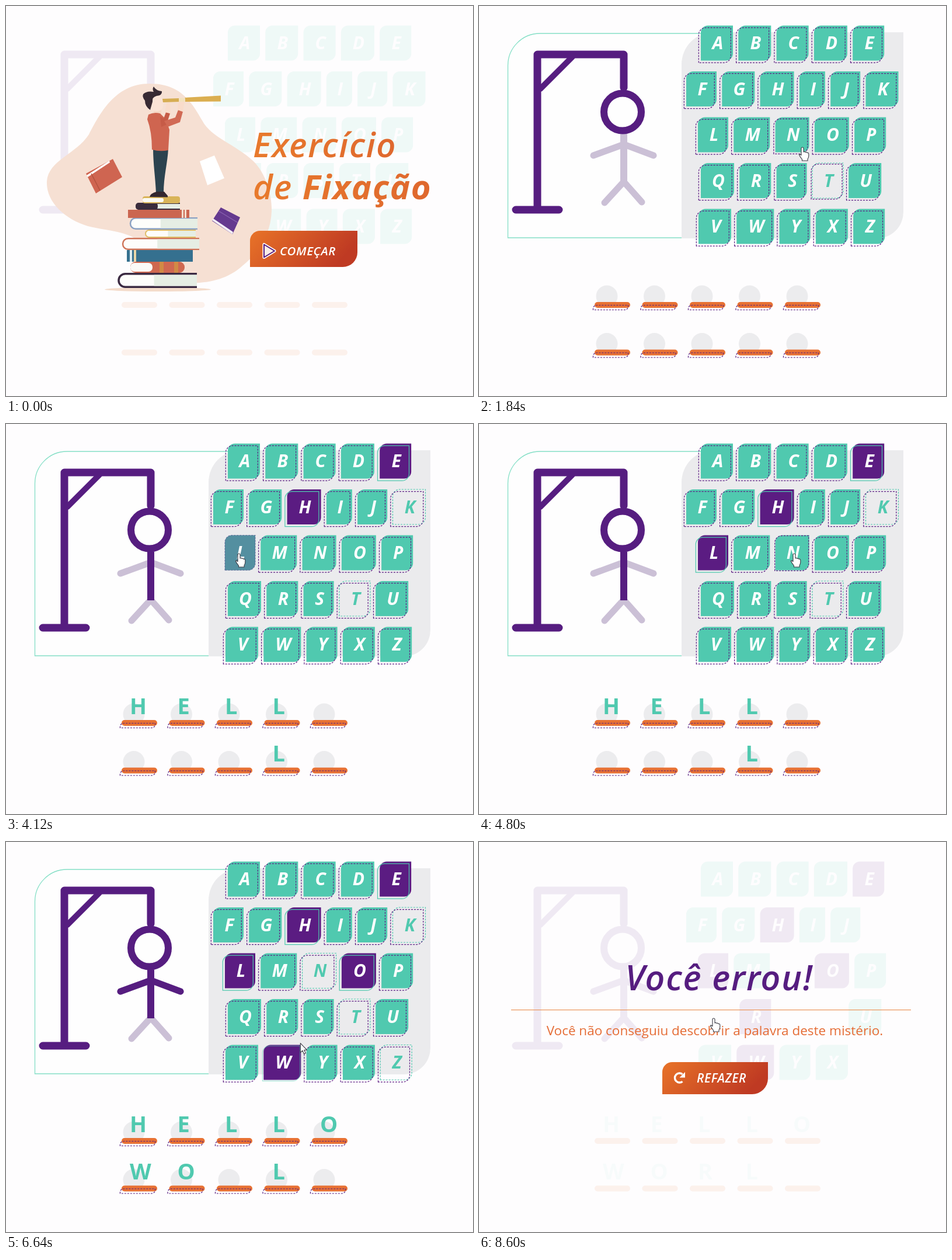
Animation of 800 by 668 pixels, one loop 9.36 s. Source, as an HTML page:

```html
<!DOCTYPE html>
<html lang="pt">
<head>
<meta charset="utf-8">
<style>
html, body { margin: 0; width: 100%; height: 100%; overflow: hidden; background: #fefdfe; }
svg { display: block; width: 100vw; height: 100vh; }
text { font-family: "Open Sans", "Noto Sans", sans-serif; font-weight: 600; }
.it { font-style: italic; }
.title { letter-spacing: 0.03em; }
</style>
</head>
<body>
<svg id="stage" viewBox="0 0 800 668">
  <defs>
    <linearGradient id="btn" x1="0" y1="0" x2="1" y2="0.3">
      <stop offset="0" stop-color="#e87328"/><stop offset="1" stop-color="#bf3a23"/>
    </linearGradient>
    <linearGradient id="title" x1="0" y1="0" x2="1" y2="0">
      <stop offset="0" stop-color="#e87a2c"/><stop offset="1" stop-color="#df682e"/>
    </linearGradient>
  </defs>
  <g id="game"></g>
  <g id="intro"></g>
  <g id="over"></g>
  <g id="cursor"></g>
</svg>
<script>
const LOOP = 9360, STEP = 40;
const TEAL = [80, 201, 175], PURPLE = [91, 28, 130];
const rgb = c => `rgb(${c.map(Math.round).join()})`;
const mix = (a, b, k) => rgb(a.map((v, i) => v + (b[i] - v) * k));
const teal = rgb(TEAL), purple = rgb(PURPLE), ink = '#561d80';
const clamp = v => Math.max(0, Math.min(1, v));
const ramp = (t, start, span) => clamp((t - start) / span);
const $ = id => document.getElementById(id);

function add(parent, tag, attrs, text) {
  const el = document.createElementNS('http://www.w3.org/2000/svg', tag);
  for (const k in attrs) el.setAttribute(k, attrs[k]);
  if (text) el.textContent = text;
  parent.append(el);
  return el;
}

// Box with only its top-left and bottom-right corners rounded
const leaf = (x, y, w, h, a, b = a) =>
  `M${x} ${y + h}V${y + a}a${a} ${a} 0 0 1 ${a} ${-a}H${x + w}V${y + h - b}a${b} ${b} 0 0 1 ${-b} ${b}Z`;

const dashes = { fill: 'none', 'stroke-width': 1.2, 'stroke-dasharray': '3 2' };

// ---- Game board ----
const game = $('game');
// Fine details that vanish completely when the board is faded
const details = [add(game, 'g', {})];
add(details[0], 'path', { d: leaf(49.5, 47, 400, 350, 55, 0), fill: '#fefefe', stroke: '#84dfc6', 'stroke-width': 1.3 });
add(details[0], 'path', { d: leaf(347, 45, 380, 353, 55, 45), fill: '#ebebed' });

const line = (d, color, width) => add(game, 'path', {
  d, fill: 'none', stroke: color, 'stroke-width': width, 'stroke-linecap': 'round', 'stroke-linejoin': 'round'
});
const limbs = [
  'M214 181.5a32 32 0 1 1 64 0a32 32 0 1 1 -64 0',
  'M248 219V302',
  'M248 237L196 256',
  'M248 237L299 256',
  'M248 301L215 337',
  'M248 301L279 336'
];
const drawLimb = (i, color) => {
  const el = line(limbs[i], color, i ? 11 : 12);
  if (i === 1) { el.setAttribute('stroke-linecap', 'butt'); el.setAttribute('stroke-width', 12); }
  return el;
};
limbs.forEach((d, i) => drawLimb(i, '#cbc0d6'));
const parts = limbs.map((d, i) => drawLimb(i, ink));
line('M105 142L160 87', ink, 10);
line('M63 349H137M100 349V83H248V140', ink, 13);

// Letter, moment of the press
const right = { H: 2160, E: 3360, L: 4080, O: 5320, W: 6360, R: 7640 };
const wrong = { T: 1680, K: 2760, N: 4920, Z: 5880, S: 6880, Q: 8320 };
const misses = Object.values(wrong);

const rows = [
  ['ABCDE', 380, [55, 56, 55, 57, 54]],
  ['FGHIJK', 355, [52, 56, 58, 44, 51, 56]],
  ['LMNOP', 375, [52, 62, 58, 59, 54]],
  ['QRSTU', 380, [57, 54, 52, 53, 56]],
  ['VWYXZ', 376, [56, 64, 53, 55, 54]]
];
const keys = [];
rows.forEach(([letters, left, widths], r) => {
  let x = left;
  const y = 33.5 + r * 78.5;
  [...letters].forEach((ch, i) => {
    const w = widths[i], d = leaf(x, y, w, 60, 12);
    keys.push({
      ch, x, y, w,
      face: add(game, 'path', { d }),
      ring: add(game, 'path', { d, ...dashes, stroke: teal }),
      edge: add(game, 'path', { d, ...dashes }),
      label: add(game, 'text', {
        x: x + w / 2 + 1.5, y: y + 40.5, class: 'it', 'font-size': 30, 'text-anchor': 'middle', style: 'font-weight:700'
      }, ch)
    });
    x += w + 9.3;
  });
});

const slots = [];
const discs = add(game, 'g', {}), bars = add(game, 'g', {}), rims = add(game, 'g', {});
details.push(discs, rims);
['HELLO', 'WORLD'].forEach((word, r) => [...word].forEach((ch, i) => {
  const x = 198 + i * 81.5, y = 507 + r * 81.5;
  add(discs, 'circle', { cx: x + 21, cy: y - 10, r: 18.5, fill: '#ececee' });
  add(bars, 'rect', { x, y, width: 61, height: 10, rx: 5, fill: '#e77134' });
  add(rims, 'path', { d: leaf(x - 2.5, y + 5.5, 60, 8, 6, 6), ...dashes, stroke: ink });
  slots.push({ ch, el: add(game, 'text', {
    x: x + 14, y: y - 10.5, fill: teal, 'font-size': 38, style: 'font-weight:700'
  }, ch) });
}));

// ---- Opening screen ----
const intro = $('intro');
const shape = (d, fill, more) => add(intro, 'path', { d, fill, ...more });
const box = (x, y, width, height, fill, rx = 0) => add(intro, 'rect', { x, y, width, height, fill, rx });

shape('M70 300C73 264 120 254 142 220C160 186 186 133 246 133C300 133 318 165 336 196C352 226 392 236 424 266C446 288 456 325 455 352C453 395 430 425 405 445C380 468 345 476 310 474C280 470 250 455 240 420C225 385 180 387 140 377C100 365 68 335 70 300Z', '#f6e0d3');
add(intro, 'ellipse', { cx: 260, cy: 485.5, rx: 91, ry: 3.5, fill: '#f4dccb' });

function book(x, y, w, h, cover, line = 2.5) {
  const r = h / 2 - line / 2, top = y + line / 2;
  shape(`M${x + w} ${top}H${x + r + 2}a${r} ${r} 0 0 0 0 ${2 * r}H${x + w}`, '#fdfdfb', { stroke: cover, 'stroke-width': line });
  box(x + w * 0.46, y + line, w * 0.54, h - 2 * line, '#e6eee4');
}
book(191, 457, 136, 26, '#3b2a42', 3.5);
box(213, 438, 93, 19, '#cf6850', 9);
box(213, 440, 38, 15, '#fbfaf7', 7);
box(263, 438, 7, 19, '#d08a45');
box(288, 438, 7, 19, '#d08a45');
box(207, 418, 113, 20, '#35708f');
box(212, 418, 4, 20, '#dcebf0');
box(219, 418, 4, 20, '#e8d6a8');
book(198, 397, 133, 21, '#cf7458');
book(237, 383, 88, 14, '#e0bd68', 2);
book(211, 362, 117, 21, '#8aa0c2');
box(209, 349, 105, 14, '#cb6650');
box(301, 349, 3, 14, '#f3dccb');
box(306, 349, 3, 14, '#f3dccb');
book(222, 337, 76, 12, '#3a2c3c', 2);
box(222, 337, 38, 12, '#3a2c3c', 5);
box(234, 326, 64, 12, '#d9b458', 4);
box(234, 329, 36, 7, '#fbfaf2', 3);

shape('M137 287L183 262L199 293L154 321Z', '#cf6551');
shape('M138 290L177 265L178 268L140 293Z', '#fff');
shape('M146 287L161 316', 'none', { stroke: '#b1523f', 'stroke-width': 1.5 });
shape('M332 266L357 256L374 295L345 307Z', '#fff');
shape('M368 345L401 362L388 391L353 368Z', '#65398f');
shape('M353 367L388 391L389 387L355 364Z', '#f3eef6');
shape('M364 351L397 371', 'none', { stroke: '#8a62b0', 'stroke-width': 1.2 });

// Man with the spyglass
shape('M252 244H278C277 268 270 292 270 320H257C256 295 252 270 252 244Z', '#2c434f');
shape('M246 327Q247 321 258 318H271L277 325V327.5Z', '#33272f');
shape('M253 172H266V188H253Z', '#f6d8c6');
shape('M244 186Q254 181 264 184L274 194L280 212L278 247Q264 250 250 246Q250 215 242 194Z', '#cf6550');
shape('M264 189L270 193L274 182L281 184L275 203L266 207Z', '#c65b47');
shape('M271 197L290 191L295 178L303 181L298 199L277 207Z', '#d16a55');
shape('M272 182L275 166L281 165L282 184Z', '#f9dccb');
shape('M294 178L295 160L302 157L306 163L303 181Z', '#f9dccb');
shape('M245 157Q250 148 264 152L270 164Q270 179 260 180Q248 181 245 170Z', '#fae3d6');
shape('M235 151Q241 145 253 147Q250 142 253 138Q257 145 267 146Q268 153 258 154Q250 156 251 164L247 178Q238 172 238 162Q233 156 235 151Z', '#372a33');
shape('M268 159L296 158V164L269 165Z', '#d6ad52');
shape('M306 157L368 153.5V163.5L307 164Z', '#dbae50');
shape('M296 157.5H307V164H296Z', '#f3e2c0');

const words = (parent, x, y, size, fill, text, more) =>
  add(parent, 'text', { x, y, 'font-size': size, fill, class: 'it title', ...more }, text);
words(intro, 423, 259, 58, 'url(#title)', 'Exercício');
const second = words(intro, 423, 331, 58, 'url(#title)', 'de ');
add(second, 'tspan', { style: 'font-weight:700' }, 'Fixação');

shape(leaf(418, 385, 184, 62, 17, 25), 'url(#btn)');
shape('M442 408.5V430.5L460 419.5Z', '#fbeee6', { stroke: '#fff', 'stroke-width': 5, 'stroke-linejoin': 'round' });
shape('M442 408.5V430.5L460 419.5Z', '#fbeee6', { stroke: ink, 'stroke-width': 2, 'stroke-linejoin': 'round' });
words(intro, 469, 427, 20.5, '#fff', 'COMEÇAR');

// ---- Closing screen ----
const over = $('over');
words(over, 411.5, 254, 59, ink, 'Você errou!', { 'text-anchor': 'middle' });
add(over, 'rect', { x: 55, y: 287, width: 685, height: 1.2, fill: '#eb9459' });
add(over, 'text', {
  x: 404, y: 331, 'font-size': 22.5, fill: '#e56c35', 'text-anchor': 'middle', style: 'font-weight:400'
}, 'Você não conseguiu descobrir a palavra deste mistério.');
add(over, 'path', { d: leaf(314, 377, 181, 55, 17, 27), fill: 'url(#btn)' });
add(over, 'path', { d: 'M348.5 410.2A8 8 0 1 1 348.5 397.8', fill: 'none', stroke: '#fff', 'stroke-width': 3.4 });
add(over, 'path', { d: 'M353 394V403.5H343.5Z', fill: '#fff' });
words(over, 373, 411.5, 21, '#fff', 'REFAZER');

// ---- Cursor ----
const pen = { fill: '#fff', stroke: '#3a3a44', 'stroke-width': 1.1, 'stroke-linejoin': 'round' };
const hand = add($('cursor'), 'path', { ...pen,
  d: 'M-2 2Q-2 0 0 0T2 2V8Q4 6.6 5 8.6Q7 7.4 8 9.4Q10.5 8.6 10.8 11.5V15Q10.5 18 9 20V23H-0.5V20.5Q-4 16.5 -5.5 13Q-5.5 10.5 -2 13.5Z' });
const arrow = add($('cursor'), 'path', { ...pen, d: 'M0 0V16L3.6 12.6L6.2 18.4L9 17.2L6.4 11.6H11.3Z' });

// Time, x, y
const path = [
  [1000, 560, 430], [1560, 604, 300], [1720, 604, 300], [1840, 554, 242], [2080, 511, 145],
  [2240, 511, 145], [2640, 690, 144], [2800, 690, 144], [3160, 667, 79], [3520, 667, 79],
  [3960, 399, 222], [4320, 399, 222], [4800, 540, 222], [5040, 540, 222], [5280, 605, 224],
  [5440, 605, 224], [5640, 649, 351], [5800, 668, 374], [6040, 668, 374], [6320, 475, 378],
  [6480, 475, 378], [6840, 541, 303], [7280, 541, 303], [7440, 483, 305], [7960, 483, 305], [8200, 402, 302]
];
function cursorAt(t) {
  const i = path.findIndex(p => p[0] > t);
  if (i <= 0) return (i ? path[path.length - 1] : path[0]).slice(1);
  const [t0, x0, y0] = path[i - 1], [t1, x1, y1] = path[i];
  const k = (t - t0) / (t1 - t0);
  return [x0 + (x1 - x0) * k, y0 + (y1 - y0) * k];
}
const keyAt = t => {
  if (t < path[0][0]) return null;
  const [x, y] = cursorAt(t);
  return keys.find(k => x > k.x + 6 && x < k.x + k.w - 6 && y > k.y + 6 && y < k.y + 54);
};

function drawKey(key, t, recent, presence) {
  const { ch, face, ring, edge, label } = key;
  const good = ch in right ? ramp(t, right[ch], 120) : 0;
  const bad = ch in wrong ? ramp(t, wrong[ch], 120) : 0;
  const hover = recent.filter(k => k === key).length / recent.length;
  const shift = 3.7 * (1 - hover);
  face.setAttribute('fill', mix(TEAL, PURPLE, good));
  face.setAttribute('opacity', 1 - bad);
  ring.setAttribute('opacity', bad * presence);
  edge.setAttribute('stroke', mix(PURPLE, TEAL, good));
  edge.setAttribute('stroke-dasharray', good === 1 ? 'none' : '3 2');
  edge.setAttribute('opacity', (1 - good * hover) * presence);
  edge.setAttribute('transform', `translate(${-shift} ${shift})`);
  label.setAttribute('fill', mix([255, 255, 255], TEAL, bad));
  label.setAttribute('opacity', 1 - bad * (1 - presence));
}

function draw(time) {
  const t = Math.floor(time / STEP) * STEP;
  const enter = ramp(t, 0, 320), leave = ramp(t, 8320, 280);
  const presence = enter * (1 - leave);
  game.setAttribute('opacity', 0.09 + 0.91 * presence);
  details.forEach(g => g.setAttribute('opacity', presence));
  intro.setAttribute('opacity', 1 - enter);
  over.setAttribute('opacity', leave);

  const recent = [0, 40, 80, 120].map(d => keyAt(t - d));
  keys.forEach(k => drawKey(k, t, recent, presence));
  slots.forEach(s => s.el.setAttribute('opacity', t > right[s.ch] ? 0.4 + 0.6 * presence : 0));
  parts.forEach((p, i) => p.setAttribute('opacity', ramp(t, misses[i], 120)));

  const [x, y] = cursorAt(t), shown = t >= 1040;
  $('cursor').setAttribute('transform', `translate(${x} ${y})`);
  hand.setAttribute('opacity', shown && recent[0] ? 1 : 0);
  arrow.setAttribute('opacity', shown && !recent[0] ? 1 : 0);
}

const begin = performance.now();
function tick() {
  draw((performance.now() - begin) % LOOP);
  requestAnimationFrame(tick);
}
tick();
</script>
</body>
</html>
```
